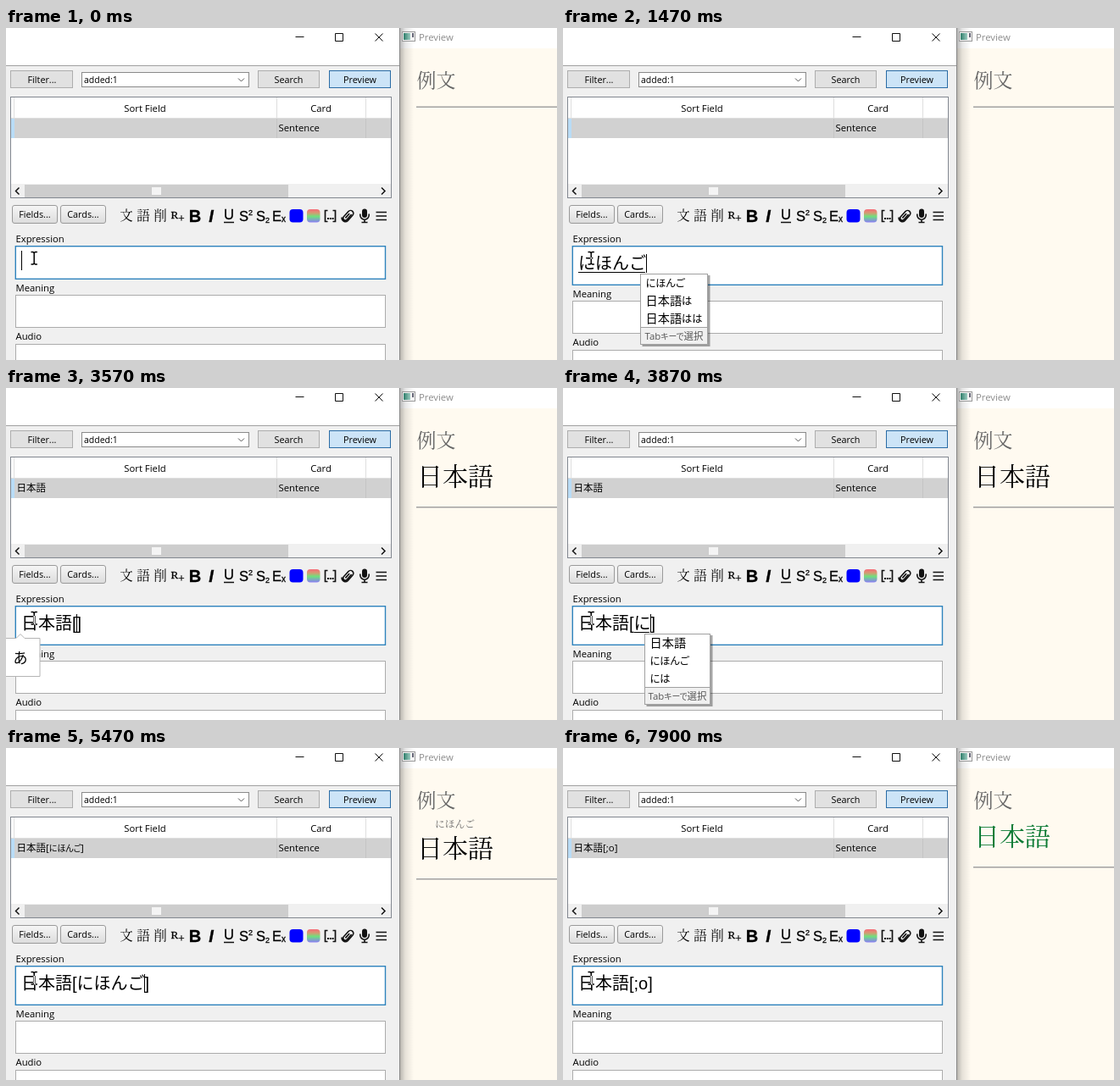
These frames come from a looping animation (650x392 px, 8000 ms). An HTML page:

```html
<!DOCTYPE html>
<html lang="ja">
<head>
<meta charset="utf-8">
<style>
html, body { margin: 0; width: 100%; height: 100%; overflow: hidden; background: #f0f0f0; }
svg { display: block; }
text { font: 11.3px 'Open Sans', 'Noto Sans', 'Noto Sans CJK JP', 'Noto Sans CJK', sans-serif; fill: #000; white-space: pre; }
.mid { text-anchor: middle; }
.btn { font-size: 10.8px; text-anchor: middle; }
.cell { font-size: 11.5px; }
.item { font-size: 14.2px; font-weight: 300; }
.foot { font-size: 11.4px; fill: #555; text-anchor: middle; }
.edit { font: 300 20px 'Liberation Sans', 'Noto Sans CJK JP', 'Noto Sans CJK', sans-serif; }
.kana { font-size: .86em; font-feature-settings: 'palt'; }
.serif { font-family: 'Noto Serif CJK JP', 'Noto Serif', 'Noto Sans CJK JP', 'Noto Sans CJK', serif; }
.kanji text { font-size: 15.5px; font-weight: 500; text-anchor: middle; }
.tool text { font: 16.5px 'Liberation Sans', Arial, sans-serif; text-anchor: middle; stroke: #000; stroke-width: .3; }
.tool .strong { font-size: 20px; font-weight: bold; }
.tool .small { font-size: 9px; }
.line { fill: none; stroke: #111; }
#beam { mix-blend-mode: difference; fill: none; stroke: #fff; }
</style>
</head>
<body>
<svg width="650" height="392" viewBox="0 0 650 392">
  <defs>
    <linearGradient id="face" x2="0" y2="1"><stop stop-color="#f6f6f6"/><stop offset="1" stop-color="#dcdcdc"/></linearGradient>
    <linearGradient id="hues" x2="0" y2="1"><stop stop-color="#f76b78"/><stop offset=".28" stop-color="#d59a72"/><stop offset=".55" stop-color="#6fe07c"/><stop offset="1" stop-color="#8a7cf6"/></linearGradient>
    <linearGradient id="shade"><stop stop-opacity=".3"/><stop offset=".4" stop-opacity=".1"/><stop offset="1" stop-opacity="0"/></linearGradient>
    <linearGradient id="pane"><stop stop-color="#2f7d6a"/><stop offset="1" stop-color="#9ccbc0"/></linearGradient>
  </defs>

  <!-- preview window -->
  <rect x="464" width="186" height="392" fill="#fffaf0"/>
  <rect x="464" width="186" height="24" fill="#fff"/>
  <rect x="464" width="17" height="392" fill="url(#shade)"/>
  <rect x="467.5" y="4.500" width="15" height="11" fill="#f4f4f4" stroke="#999"/>
  <rect x="469" y="6" width="8" height="8" fill="url(#pane)"/>
  <rect x="479" y="6" width="2" height="5" fill="#667"/>
  <text x="487" y="15" style="fill:#8c8c8c">Preview</text>
  <text class="serif" x="484.500" y="70" style="font-size:23px;fill:#666">例文</text>
  <g id="card"></g>

  <!-- main window -->
  <rect width="464" height="392" fill="#f0f0f0"/>
  <rect width="464" height="44" fill="#fff"/>
  <path d="M0 44.500H464" stroke="#a0a0a0"/>
  <path d="M464.500 0V392" stroke="#858585"/>
  <path class="line" d="M341.500 10.500h10M388.500 6.500h9v9h-9zM435.500 6.500l9 9m0-9l-9 9"/>

  <g fill="#e1e1e1" stroke="#adadad">
    <rect x="5.500" y="50.500" width="73" height="20"/>
    <rect x="297.500" y="50.500" width="72" height="20"/>
    <rect x="89.500" y="52.500" width="197" height="17" fill="#fff" stroke="#8a8a8a"/>
    <rect x="381.500" y="50.500" width="72" height="20" fill="#cce4f7" stroke="#2a6ca5"/>
  </g>
  <text class="btn" x="42.500" y="65">Filter...</text>
  <text x="92" y="65" style="font-size:10.500px">added:1</text>
  <path class="line" d="M274 59.500l3.500 3.500l3.500-3.500" style="stroke:#555"/>
  <text class="btn" x="333.500" y="65">Search</text>
  <text class="btn" x="417.500" y="65">Preview</text>

  <rect x="5.500" y="81.500" width="449" height="119" fill="#fff" stroke="#828790"/>
  <path d="M9.500 82V106M319.500 82V106M424.500 82V106M6 106.500H454" stroke="#dedede"/>
  <rect x="6" y="107" width="448" height="23" fill="#d1d1d1"/>
  <rect x="6" y="107" width="4" height="23" fill="#b9dcf6"/>
  <path d="M319.500 107V130M424.500 107V130" stroke="#c4c4c4"/>
  <text class="mid" x="164" y="99">Sort Field</text>
  <text class="mid" x="371.500" y="99">Card</text>
  <text x="321.500" y="122">Sentence</text>
  <rect x="6" y="184" width="448" height="16" fill="#f0f0f0"/>
  <rect x="22" y="185" width="311" height="15" fill="#cdcdcd"/>
  <rect x="172" y="188" width="11" height="9" fill="#f4f4f4"/>
  <path class="line" stroke-width="1.500" d="M15.500 188.500l-4 4l4 4M443 188.500l4 4l-4 4"/>

  <g fill="url(#face)" stroke="#9a9a9a">
    <rect x="7.500" y="209.500" width="53" height="21" rx="2.500"/>
    <rect x="64.500" y="209.500" width="53" height="21" rx="2.500"/>
  </g>
  <text class="btn" x="34" y="224">Fields...</text>
  <text class="btn" x="91" y="224">Cards...</text>

  <!-- editor toolbar -->
  <g class="kanji">
    <text class="serif" x="142" y="227">文</text>
    <text class="serif" x="162" y="227">語</text>
    <text class="serif" x="182" y="227">削</text>
  </g>
  <g class="tool">
    <text x="202.500" y="225" style="font:13px 'Liberation Serif',serif">R<tspan dy="4">+</tspan></text>
    <text class="strong" x="223" y="229">B</text>
    <text class="strong" x="242" y="229" style="font-style:italic">I</text>
    <text x="263" y="226">U</text>
    <text x="283" y="228">S<tspan class="small" dy="-7">2</tspan></text>
    <text x="303" y="228">S<tspan class="small" dy="2">2</tspan></text>
    <text x="322" y="228">E<tspan dy="1" style="font-size:10px">x</tspan></text>
  </g>
  <path class="line" stroke-width="1.500" d="M257 229.500h12"/>
  <rect x="334.500" y="214" width="16" height="15.500" rx="4" fill="#00f"/>
  <rect x="355" y="214" width="15.500" height="15.500" rx="4" fill="url(#hues)"/>
  <path class="line" stroke-width="1.700" d="M379.500 215.500h-3v13h3M385.500 215.500h3v13h-3"/>
  <path d="M379 225h2M381.800 225h2M384.600 225h2" stroke="#111" stroke-width="2"/>
  <path class="line" stroke-width="1.900" stroke-linecap="round" transform="translate(402.500 222) rotate(42) scale(.84)" d="M3-5v9a3 3 0 0 1-6 0v-10a4 4 0 0 1 8 0v10.500a5 4.500 0 0 1-9 2.500M0-4v7"/>
  <rect x="420" y="213.500" width="6" height="10.500" rx="3" fill="#111"/>
  <path class="line" stroke-width="1.600" d="M417.800 219.500v1.500a5 5 0 0 0 10.400 0v-1.500M423 226v3.500M419.500 229.500h7"/>
  <path class="line" stroke-width="1.700" d="M436.500 217.500h12.500M436.500 222h12.500M436.500 226.500h12.500"/>

  <!-- fields -->
  <text x="11.500" y="252.500">Expression</text>
  <rect id="box" x="11.300" y="257.700" width="436.200" fill="#fff" stroke="#2f83bd" stroke-width="1.400"/>
  <g id="below">
    <text x="11.500" y="310.500">Meaning</text>
    <rect x="11.500" y="315.500" width="436" height="38" fill="#fff" stroke="#ababab"/>
    <text x="11.500" y="368">Audio</text>
    <rect x="11.500" y="373.500" width="436" height="40" fill="#fff" stroke="#ababab"/>
  </g>
  <g id="live"></g>
  <path id="beam" stroke-width="1.500"/>
  <g id="pops"></g>
</svg>
<script>
const $ = id => document.getElementById(id);
const LOOP = 8000, LEFT = 18;

// pre + comp (being composed) + post is the edited text; the caret sits before post
const start = { pre: '', comp: '', post: '', list: null, caret: 1, ime: '', imeX: 17, sort: '', card: 'none', tall: 0 };
const short = ['日本語', 'にほんご', 'には'], mid = ['日本語', '日本', 'にほんご'];
const long = ['日本語', 'にほんご', '日本語学習'], full = ['にほんご', '日本語は', '日本語はは'];

const steps = [
  [330, { caret: 0 }],
  [800, { comp: 'ｎ', caret: 1, tall: 1 }],
  [870, { list: short }],
  [930, { comp: 'に' }],
  [1000, { comp: 'にｈ' }],
  [1070, { comp: 'にほ', list: mid }],
  [1130, { comp: 'にほｎ', list: long }],
  [1230, { comp: 'にほん' }],
  [1300, { comp: 'にほんｇ' }],
  [1400, { comp: 'にほんご' }],
  [1470, { list: full }],
  [1500, { comp: '日本語', list: null, caret: 0 }],
  [1630, { pre: '日本語', comp: '', caret: 1 }],
  [2170, { caret: 0 }],
  [2270, { sort: '日本語', card: 'plain' }],
  [2670, { ime: 'A' }],
  [2730, { caret: 1 }],
  [2930, { pre: '日本語[' }],
  [2970, { pre: '日本語[]' }],
  [3030, { ime: '' }],
  [3170, { pre: '日本語[', post: ']' }],
  [3570, { ime: 'あ' }],
  [3730, { comp: 'ｎ', ime: '' }],
  [3870, { comp: 'に', list: short }],
  [3970, { comp: 'にｈ' }],
  [4070, { comp: 'にほ', list: mid }],
  [4130, { comp: 'にほｎ', list: long }],
  [4200, { comp: 'にほん' }],
  [4270, { comp: 'にほんｇ' }],
  [4330, { comp: 'にほんご' }],
  [4370, { pre: '日本語[にほんご', comp: '', list: null }],
  [4930, { caret: 0 }],
  [4970, { sort: '日本語[にほんご]' }],
  [5030, { card: 'ruby' }],
  [5470, { caret: 1 }],
  [6000, { caret: 0 }],
  [6130, { pre: '日本語[にほん', caret: 1 }],
  [6200, { pre: '日本語[にほ' }],
  [6370, { pre: '日本語[に' }],
  [6500, { pre: '日本語[' }],
  [6830, { ime: 'A', imeX: 163 }],
  [7030, { caret: 0 }],
  [7130, { pre: '日本語[;', ime: '', caret: 1 }],
  [7330, { pre: '日本語[;o' }],
  [7830, { caret: 0 }],
  [7900, { sort: '日本語[;o]', card: 'green' }]
];

const width = s => [...s].reduce((w, c) => w + (c > 'ÿ' ? 20 : c == 'o' ? 11.1 : 5.5), 0);
const kana = s => s.replace(/[ぁ-ヿ]+/g, k => `<tspan class="kana">${k}</tspan>`);
const text = (s, x, y, cls, style = '') => `<text x="${x}" y="${y}" class="${cls}" style="${style}">${s}</text>`;
const rect = (x, y, w, h, fill, more = '') => `<rect x="${x}" y="${y}" width="${w}" height="${h}" fill="${fill}" ${more}/>`;

function card(kind) {
  const drop = kind == 'ruby' ? 14 : 0, color = kind == 'green' ? '#0b7a33' : '#000';
  const rule = y => rect(484, y, 166, 1.5, '#a2a2a2');
  if (kind == 'none') return rule(92.5);
  return (drop ? text('にほんご', 529.5, 94, 'serif mid', 'font-size:11.8px;fill:#666') : '') +
    text('日本語', 485, 115 + drop, 'serif', `font-size:30px;fill:${color}`) + rule(140 + drop);
}

function candidates(list, caret) {
  const x = caret - 6.5, w = list == long ? 83 : list == full ? 79 : 77;
  return rect(x + 2, 292, w + 1, 84, '#000', 'opacity=".35"') +
    rect(x, 290.5, w, 83, '#fff', 'stroke="#a0a0a0"') +
    rect(x + .5, 354, w - 1, 19, '#f0f0f0') +
    `<path d="M${x} 353.500h${w}" stroke="#a0a0a0"/>` +
    list.map((s, i) => text(kana(s), x + 6, 305.5 + 21 * i, 'item')).join('') +
    text(kana('Tabキーで選択'), x + w / 2, 368, 'foot');
}

const indicator = (s, x) =>
  `<path d="M${x - 23} 295.500h18l5-5l5 5h18v45h-46z" fill="#fff" stroke="#b4b4b4"/>` +
  text(s, x, 325, 'mid', 'font-size:17px');

function draw(s) {
  const from = LEFT + width(s.pre), caret = Math.floor(from + width(s.comp));
  $('card').innerHTML = card(s.card);
  $('box').setAttribute('height', s.tall ? 45.6 : 38.6);
  $('below').setAttribute('transform', `translate(0 ${7 * s.tall})`);
  $('live').innerHTML = text(kana(s.sort), 12.5, 122, 'cell') +
    text(s.pre + s.comp + s.post, LEFT, 284.5, 'edit') +
    (s.comp ? rect(from, 288, caret - from - 1, 1, '#000') : '') +
    (s.caret ? rect(caret, s.tall ? 267 : 263, 1, s.tall ? 22 : 23, '#000') : '');
  $('pops').innerHTML = (s.list ? candidates(s.list, caret) : '') + (s.ime ? indicator(s.ime, s.imeX) : '');
}

$('beam').setAttribute('d', 'M29.5 264.5h2.5l1.200 1.200l1.200-1.200h2.500M33.200 265.500v12.500M29.500 279h2.500l1.200-1.200l1.200 1.200h2.500');

let shown = -1;
function tick() {
  const t = performance.now() % LOOP;
  const past = steps.filter(([at]) => at <= t);
  if (past.length != shown) {
    shown = past.length;
    draw(Object.assign({}, start, ...past.map(p => p[1])));
  }
  requestAnimationFrame(tick);
}
tick();
</script>
</body>
</html>
```
